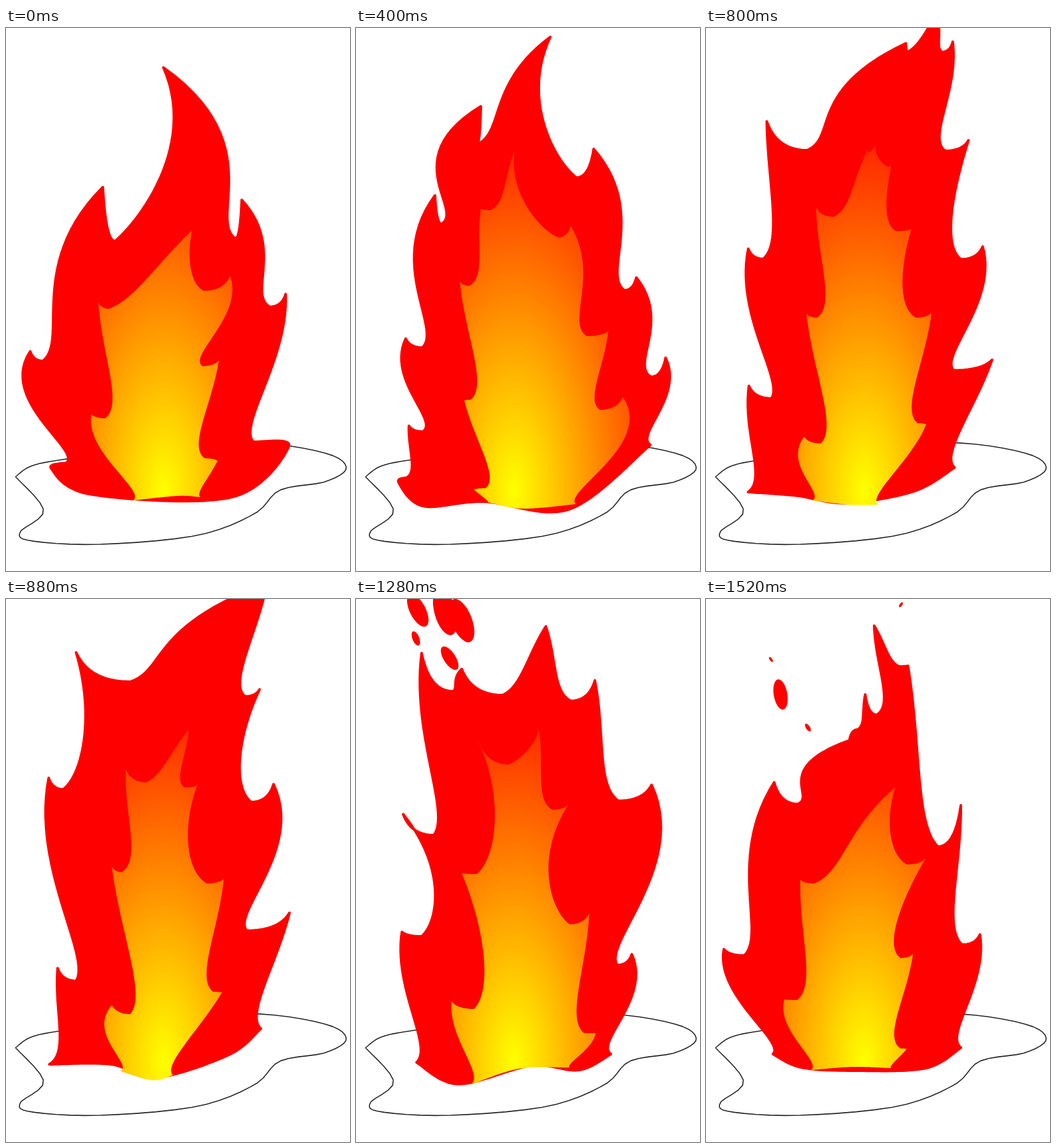
Recreate the animation shown at these times as an HTML page with a canvas. Size 540x853 px, loop 1600 ms.

```html
<!DOCTYPE html>
<html lang="en">
<head>
<meta charset="utf-8">
<title>Fire</title>
<style>
html, body { margin: 0; width: 100%; height: 100%; overflow: hidden; background: #fff; }
canvas { display: block; }
</style>
</head>
<body>
<canvas width="540" height="853"></canvas>
<script>
const ctx = document.querySelector('canvas').getContext('2d');
const poses = [], sparks = {};

const numbers = text => text.trim().split(' ').map(Number);
const mix = (a, b, t) => a + (b - a) * t;
const mixPoint = (p, q, t) => [mix(p[0], q[0], t), mix(p[1], q[1], t)];
const last = list => list[list.length - 1];
const samples = (count, fn) => Array.from({ length: count }, (_, i) => fn(i / (count - 1)));

// Bezier curve of any degree.
function bezier(pts, t) {
  while (pts.length > 1) pts = pts.slice(1).map((p, i) => mixPoint(pts[i], p, t));
  return pts[0];
}

// Smooth curve through the points.
function spline(text) {
  const n = numbers(text);
  const pts = n.filter((_, i) => i % 2 === 0).map((x, i) => [x, n[2 * i + 1]]);
  return samples(80, t => {
    const u = t * (pts.length - 1), k = Math.min(Math.floor(u), pts.length - 2);
    const p = pts[k], q = pts[k + 1], before = pts[k - 1] || p, after = pts[k + 2] || q;
    const c = p.map((v, i) => v + (q[i] - before[i]) / 6);
    const d = q.map((v, i) => v - (after[i] - p[i]) / 6);
    return bezier([p, c, d, q], u - k);
  });
}

// A tongue hooks from the tip below into a valley, then swells outward on its way to its own tip.
function tongue(below, valley, tip, bulge, inward) {
  const h = valley[1] - tip[1];
  const hook = [mix(below[0], valley[0], 0.25), valley[1]];
  const waist = mixPoint(valley, tip, 0.12), belly = mixPoint(valley, tip, 0.56);
  waist[0] += inward * 30 * Math.min(1, h / 150);
  belly[0] -= inward * 0.29 * h * bulge;
  return [
    ...samples(12, t => bezier([below, hook, valley], t)),
    ...samples(28, t => bezier([valley, waist, belly, tip], t))
  ];
}

// Tongues from the base up, each "valley, tip, bulge"; the first one starts at the base.
function side(text, start, inward, bulge, apex) {
  let below = start;
  return text.split('/').map((part, i, all) => {
    const n = numbers(part);
    if (i === 0) n.unshift(...start);
    if (apex && i === all.length - 1) n.splice(2, 0, ...apex);
    const [vx, vy, tx, ty, b = bulge] = n;
    const pts = tongue(below, [vx, vy], [tx, ty], b, inward);
    below = [tx, ty];
    return pts;
  });
}

// rise: how many tongues have grown at the foot of each side since the previous pose.
function flame(bulge, base, left, right, rise = [1, 1]) {
  const floor = spline(base);
  const leftSide = side(left, floor[0], 1, bulge);
  const rightSide = side(right, last(floor), -1, bulge, last(last(leftSide)));
  return { base: [floor], left: leftSide, right: rightSide, rise };
}
const outer = (...shape) => flame(1, ...shape);
const inner = (...shape) => flame(0, ...shape);
const pose = (step, body, core) => poses.push({ step, body, core });

pose(0,
  outer('95 683 71 692 135 733 355 737 444 657 388 650',
    '38 508 1.5 / 58 523 152 250 / 171 335 247 62 -1.1',
    '439 418 .4 / 414 438 370 270 / 360 331 1.5'),
  inner('200 742 270 735 305 737',
    '134 607 1 / 156 613 145 431 / 162 441 292 318',
    '332 680 / 312 676 334 522 / 308 531 352 390 1 / 310 413 -.6'));

pose(5,
  outer('80 706 67 714 105 751 200 744 335 756 462 655',
    '83 625 0 / 105 634 78 488 / 104 502 124 263 / 134 308 196 123 2 / 190 183 305 14',
    '486 518 / 463 548 440 392 / 421 412 373 190 / 346 235 -1', [2, 2]),
  inner('207 745 262 755 345 748',
    '185 725 / 203 723 170 585 / 180 584 163 398 / 178 405 196 284 / 212 286 249 192',
    '419 580 1.7 / 383 600 396 476 / 362 484 337 311 .7 / 317 329 -1', [2, 1]));

pose(8,
  outer('62 725 95 742 190 735 280 751 370 722',
    '40 527 .5 / 88 546 65 478 / 90 490 66 272 / 86 316 121 122 1.5 / 129 163 258 -20 -.5',
    '457 578 0 / 410 571 463 448 0 / 430 452 440 245 0 / 376 273 342 115 / 291 163 .5'),
  inner('142 743 205 734 285 751',
    '130 650 1 / 150 654 141 507 / 160 507 143 312 / 162 314 188 162 / 196 176 224 147',
    '359 632 1 / 347 629 378 465 / 357 471 367 361 / 335 366 298 242 -1 / 280 243 -1', [0, 1]));

pose(11,
  outer('68 731 165 731 235 752 350 716 400 675',
    '81 580 0 / 110 600 67 281 .5 / 90 299 110 84 -.6 / 195 130 410 -25 2',
    '445 493 0 / 378 521 420 291 / 385 319 398 142 -.6 / 375 153 0', [0, 0]),
  inner('180 742 230 756 262 748',
    '166 638 1.5 / 195 652 166 420 / 182 429 188 267 / 220 288 287 205',
    '339 618 / 325 617 342 439 / 315 447 300 293 -.7 / 280 296', [0, 0]));

pose(14,
  outer('92 717 135 750 235 743 320 754 405 695',
    '111 500 / 122 502 80 112 .3 / 110 143 127 45 -1 / 150 52 195 100 0 / 226 145 298 128',
    '458 452 / 418 488 450 292 / 424 297 360 106 1.4 / 311 174 0', [0, 1]),
  inner('168 747 225 742 280 751',
    '178 520 / 198 517 167 299 / 190 304 213 229 -1',
    '364 623 / 350 622 379 424 -.6 / 365 422 342 296 -1 / 305 303 1', [0, 1]));

pose(16,
  outer('95 728 160 762 275 733 350 740 400 715',
    '72 523 .4 / 103 530 74 338 -1 / 122 371 103 85 .3 / 152 145 166 110 / 230 151 298 43 0',
    '433 558 / 410 575 464 292 / 412 317 375 128 0 / 337 160 0'),
  inner('180 763 255 738 335 736',
    '150 632 .5 / 185 644 166 431 -.5 / 190 432 191 220 -.7 / 240 260 287 205 -1',
    '376 682 1 / 358 682 366 494 / 335 511 334 322 -1 / 308 331'));

pose(19,
  outer('105 715 150 736 235 741 345 737 400 705',
    '28 550 / 60 560 107 288 .7 / 144 322 225 222 3 / 238 205 250 150 0 / 268 182 264 42 0',
    '430 527 .5 / 402 543 400 324 0 / 364 389 317 105 0 / 303 106 0'),
  inner('165 740 230 735 290 737',
    '123 629 1 / 143 630 148 441 / 170 447 297 296 .5',
    '315 707 / 305 706 325 557 / 305 564 345 407 -.5 / 315 417 -.7'));

// Sparks by the step at which they break away: x, y, length, angle.
sparks[8] = ['212 0 32 .4', '496 406 66 -.95', '475 452 14 -1.3'];
sparks[14] = ['103 14 46 1.1', '347 10 30 1.5', '306 106 26 -.8', '66 497 32 1'];
sparks[16] = ['97 18 56 1.1', '140 20 76 1.3', '166 34 72 1.2', '94 62 24 1.2', '147 93 42 1'];
sparks[19] = ['102 95 9 1', '117 150 48 1.4', '160 202 14 1', '306 9 9 -1'];

const puddle = spline('15 705 40 688 95 677 250 655 400 652 505 669 534 692 500 713 430 726 390 763 300 797 150 811 42 806 22 792 59 758 15 705');
const glow = ctx.createRadialGradient(0, 0, 0, 0, 0, 640);
glow.addColorStop(0, '#ff0');
glow.addColorStop(1, '#f00');

// New tongues grow out of the base, spare ones melt into the apex.
function blend(from, to, rise, k) {
  const still = p => from[0].map(() => p);
  const top = edge => last(last(edge));
  return samples(Math.max(from.length + rise, to.length) + 1, t => t).slice(1).flatMap((_, j) => {
    const a = from[j - rise] || still(j < rise ? from[0][0] : top(from));
    const b = to[j] || still(top(to));
    return a.map((p, i) => mixPoint(p, b[i], k));
  });
}

function trace(pts) {
  ctx.beginPath();
  for (const p of pts) ctx.lineTo(...p);
  ctx.closePath();
}

function traceFlame(from, to, k) {
  trace([
    ...blend(from.left, to.left, to.rise[0], k),
    ...blend(from.right, to.right, to.rise[1], k).reverse(),
    ...blend(from.base, to.base, 0, k).reverse()
  ]);
}

function draw(step) {
  ctx.fillStyle = '#fff';
  ctx.fillRect(0, 0, 540, 853);
  ctx.lineWidth = 1.6;
  ctx.strokeStyle = '#222';
  trace(puddle);
  ctx.stroke();

  const next = Math.max(1, poses.findIndex(p => p.step >= step));
  const from = poses[next - 1], to = poses[next];
  const k = (step - from.step) / (to.step - from.step);

  ctx.fillStyle = ctx.strokeStyle = '#f00';
  ctx.lineWidth = 4;
  ctx.lineJoin = 'round';
  traceFlame(from.body, to.body, k);
  ctx.fill();
  ctx.stroke();

  for (const age of [0, 1])
    for (const spark of sparks[step - age] || []) {
      const [x, y, length, angle] = numbers(spark);
      ctx.beginPath();
      ctx.ellipse(x, y - 45 * age, length / 2, length / 4.5, angle, 0, 2 * Math.PI);
      ctx.fill();
    }

  traceFlame(from.core, to.core, k);
  ctx.save();
  ctx.translate(248, 728);
  ctx.scale(0.45, 1);
  ctx.fillStyle = glow;
  ctx.fill();
  ctx.restore();
}

function tick() {
  draw(Math.floor(performance.now() / 80) % 20);
  requestAnimationFrame(tick);
}
tick();
</script>
</body>
</html>
```
